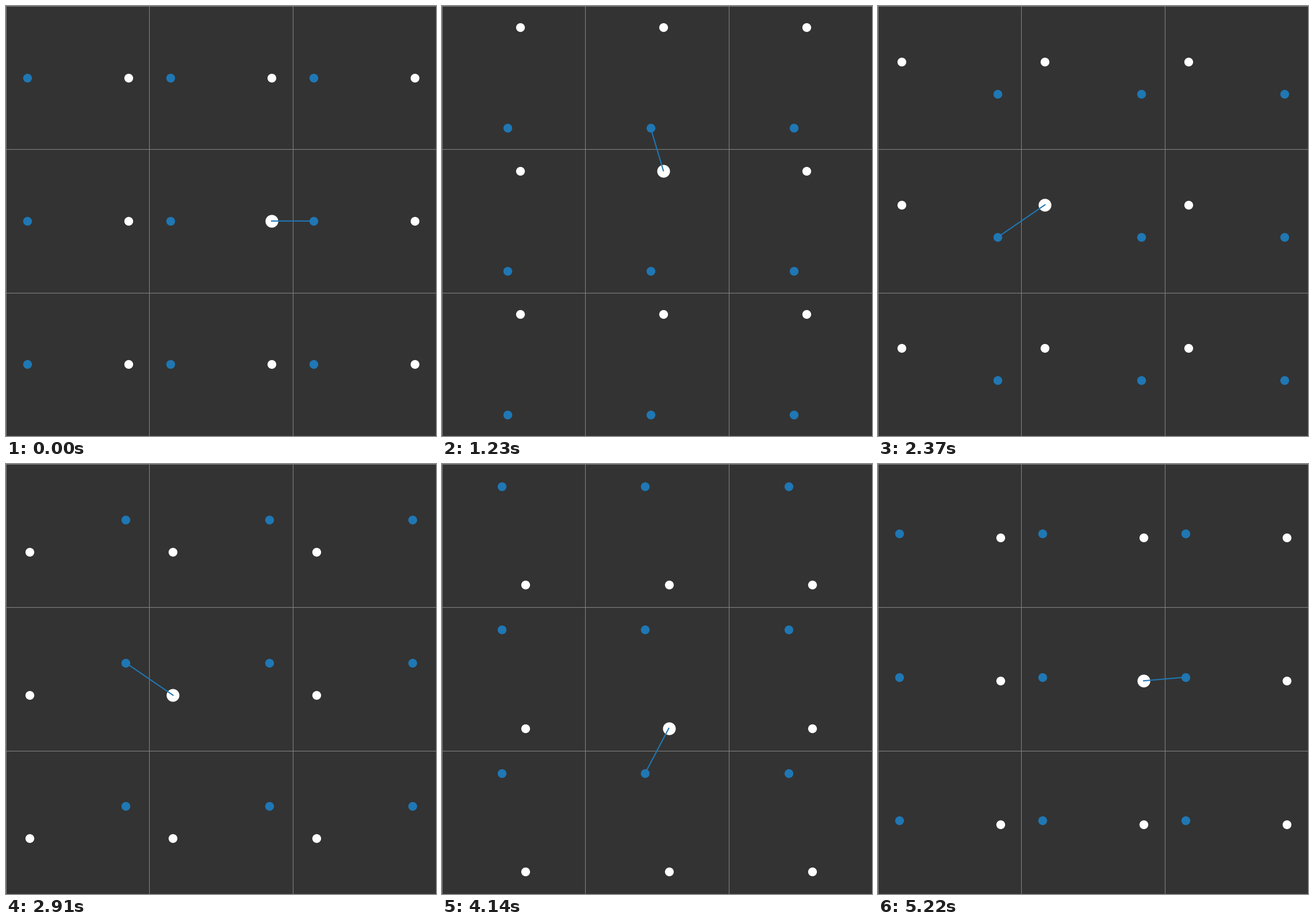
Recreate the animation shown at these times as a matplotlib script. Size 748x748 px, loop 5250 ms.

```python
import numpy as np
import matplotlib.pyplot as plt
from matplotlib.animation import FuncAnimation

FRAMES = 175
STEPS = FRAMES - 1          # the resting pose is held for two ticks
RADIUS = np.sqrt(2) / 4     # in cell widths
BLUE = "#1f77b4"

fig = plt.figure(figsize=(7.48, 7.48), dpi=100, facecolor="#333333")
ax = fig.add_axes([0, 0, 1, 1])
ax.set(xlim=(-1.5, 1.5), ylim=(-1.5, 1.5))
ax.axis("off")

for edge in np.arange(4) - 1.5:
    ax.axvline(edge, color="gray", lw=0.8, zorder=1)
    ax.axhline(edge, color="gray", lw=0.8, zorder=1)

# Offsets of the nine periodic images
cells = np.array([(i, j) for i in (-1, 0, 1) for j in (-1, 0, 1)])


def dots(color, size):
    return ax.plot([], [], "o", color=color, ms=size, zorder=2)[0]


whites = dots("white", 10)
blues = dots(BLUE, 10)
main = dots("white", 15)
link, = ax.plot([], [], color=BLUE, lw=1.5, zorder=3)


def update(tick):
    angle = 2 * np.pi * max(tick - 1, 0) / STEPS
    pos = RADIUS * np.array([np.cos(angle), np.sin(angle)])
    gap = -2 * pos
    near = pos + gap - np.round(gap)    # nearest image of the other particle

    whites.set_data(*(cells + pos).T)
    blues.set_data(*(cells - pos).T)
    main.set_data(*pos[:, None])
    link.set_data(*np.array([pos, near]).T)
    return whites, blues, main, link


anim = FuncAnimation(fig, update, frames=FRAMES, interval=30,
                     repeat=True, repeat_delay=0, blit=False)
plt.show()
```
